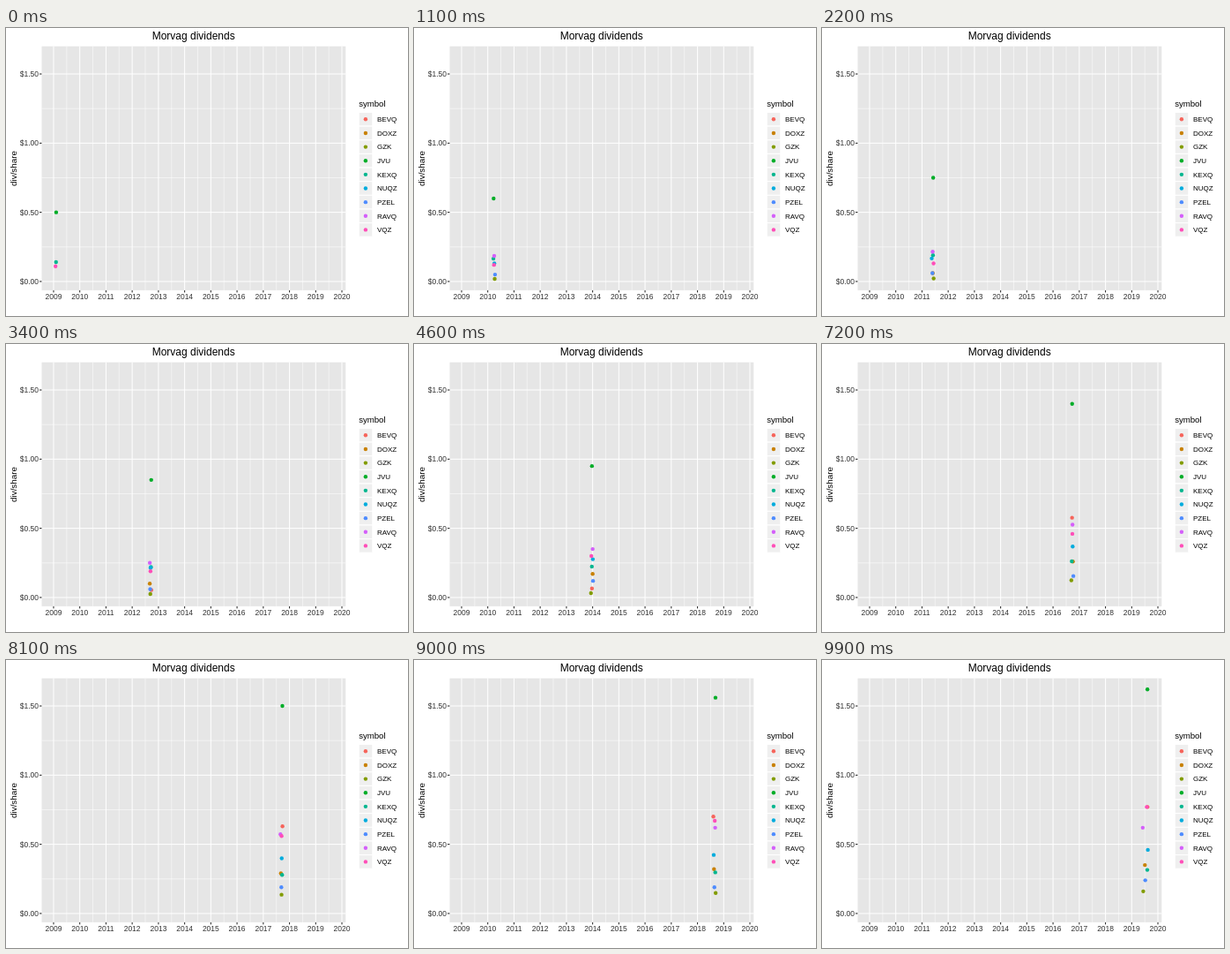
Write an HTML page with a canvas that moves like this. It is 456 px wide and 326 px high and loops after 10000 ms.

```html
<!DOCTYPE html>
<html lang="en">
<head>
<meta charset="utf-8">
<title>Morvag dividends</title>
<style>
  html, body { margin: 0; width: 456px; height: 326px; overflow: hidden; background: #fff; }
  canvas, svg { position: absolute; left: 0; top: 0; display: block; }
  text { font-family: "Liberation Sans", Arial, sans-serif; }
</style>
</head>
<body>
<canvas id="chart" width="456" height="326"></canvas>
<svg id="labels" width="456" height="326"></svg>
<script>
const DAY = 864e5;
const FRAMES = 100, FRAME_MS = 100;
const FIRST = Date.UTC(2009, 0, 28) / DAY;
const LAST = Date.UTC(2019, 7, 14) / DAY;
const SHORT_LAG = Date.UTC(2017, 8, 5) / DAY;
const panel = { l: 40.5, r: 385.3, t: 20.7, b: 296.9 };

// record: [month in quarter, day, optional weekday to move forward to]
// trend: [quarter, value] key points; the value is held between raises,
// which come every four quarters unless "every" says otherwise.
const series = [
  { name: "BEVQ", color: "#f6645b", record: [1, 8, 1], start: 14,
    trend: [[14, .054], [18, .065], [22, .47], [34, .63], [42, .77]] },
  { name: "DOXZ", color: "#c88100", record: [0, 5], start: 9,
    trend: [[9, .06], [13, .1], [17, .17], [25, .21], [29, .26], [41, .35]] },
  { name: "GZK", color: "#829c00", record: [2, 9, 3],
    trend: [[-1, .015], [23, .035], [27, .124], [39, .16]] },
  { name: "JVU", color: "#00ad28", record: [1, 10],
    trend: [[-3, .5], [1, .55], [17, .95], [21, 1.1], [25, 1.3], [33, 1.5], [41, 1.62]] },
  { name: "KEXQ", color: "#00b68f", record: [1, 7],
    trend: [[0, .14], [8, .19], [12, .22], [20, .225], [40, .315]] },
  { name: "NUQZ", color: "#00acdd", record: [1, 15, 4],
    trend: [[3, .13], [39, .46]] },
  { name: "PZEL", color: "#4e8cff", record: [0, 8, 3], start: 1, every: 8,
    trend: [[1, .05], [9, .06], [17, .12], [33, .19], [41, .24]] },
  { name: "RAVQ", color: "#d45ffa", record: [2, -1, 3],
    trend: [[-3, .16], [9, .215], [13, .25], [17, .35], [25, .48], [37, .62]] },
  { name: "VQZ", color: "#ff4eb8", record: [1, 0],
    trend: [[-1, .11], [7, .13], [15, .21], [19, .3], [27, .38], [35, .62], [39, .77]] }
];

const weekday = d => (d + 4) % 7;
const isWeekend = d => weekday(d) % 6 === 0;

// One or two business days before the record date.
function exDate([month, day, wd], q) {
  let d = Date.UTC(2009, q * 3 + month, day) / DAY;
  if (wd !== undefined) d += (wd - weekday(d) + 7) % 7;
  while (isWeekend(d)) d--;
  for (let lag = d > SHORT_LAG ? 1 : 2; lag > 0;) if (!isWeekend(--d)) lag--;
  return d;
}

function interpolate(points, x) {
  if (x <= points[0][0]) return points[0][1];
  const i = points.findIndex(p => p[0] > x);
  if (i < 0) return points[points.length - 1][1];
  const [x0, y0] = points[i - 1], [x1, y1] = points[i];
  return y0 + (y1 - y0) * (x - x0) / (x1 - x0);
}

function addTracks(s) {
  const { record, trend, start = 0, every = 4 } = s;
  const base = trend[0][0];
  s.dates = [];
  s.values = [];
  for (let q = start, date; (date = exDate(record, q)) <= LAST; q++) {
    const frame = Math.round((date - FIRST) / (LAST - FIRST) * (FRAMES - 1));
    const raise = base + Math.floor((q - base) / every) * every;
    s.dates.push([frame, date]);
    s.values.push([frame, interpolate(trend, raise)]);
  }
}
series.forEach(addTracks);

// Both scales leave 5% of the data range free on each side.
const LOW = .0165, HIGH = 1.62;
const scale = (v, a, b, from, to) => from + (to - from) * ((v - a) / (b - a) + .05) / 1.1;
const xOf = date => scale(date, FIRST, LAST, panel.l, panel.r);
const yOf = value => scale(value, LOW, HIGH, panel.b, panel.t);
const yearX = y => xOf(Date.UTC(y, 0, 1) / DAY);
const keyY = i => 103.3 + i * 15.64;

const ctx = document.getElementById("chart").getContext("2d");

function line(x1, y1, x2, y2, width, color) {
  ctx.strokeStyle = color;
  ctx.lineWidth = width;
  ctx.beginPath();
  ctx.moveTo(x1, y1);
  ctx.lineTo(x2, y2);
  ctx.stroke();
}
const vLine = (x, w) => line(x, panel.t, x, panel.b, w, "#fff");
const hLine = (y, w) => line(panel.l, y, panel.r, y, w, "#fff");

function dot(x, y, color) {
  ctx.fillStyle = color;
  ctx.beginPath();
  ctx.arc(x, y, 2.2, 0, Math.PI * 2);
  ctx.fill();
}

function drawBase() {
  ctx.fillStyle = "#fff";
  ctx.fillRect(0, 0, 456, 326);
  ctx.fillStyle = "#e6e6e6";
  ctx.fillRect(panel.l, panel.t, panel.r - panel.l, panel.b - panel.t);
  for (let y = 2009; y < 2020; y++) vLine((yearX(y) + yearX(y + 1)) / 2, .5);
  for (let v = .25; v < 1.5; v += .5) hLine(yOf(v), .5);
  for (let y = 2009; y <= 2020; y++) {
    vLine(yearX(y), 1);
    line(yearX(y), panel.b, yearX(y), panel.b + 2.5, 1, "#222");
  }
  for (let v = 0; v <= 1.5; v += .5) {
    hLine(yOf(v), 1);
    line(panel.l - 2.5, yOf(v), panel.l, yOf(v), 1, "#222");
  }
  series.forEach((s, i) => {
    ctx.fillStyle = "#efefef";
    ctx.fillRect(400.2, keyY(i) - 7.8, 15.6, 15.6);
    ctx.strokeStyle = "#fff";
    ctx.lineWidth = 1;
    ctx.strokeRect(400.2, keyY(i) - 7.8, 15.6, 15.6);
    dot(407.9, keyY(i), s.color);
  });
}

function label(str, x, y, size, anchor, color = "#000", turn = 0) {
  const el = document.createElementNS("http://www.w3.org/2000/svg", "text");
  el.textContent = str;
  const attrs = { x, y, "font-size": size, "text-anchor": anchor, fill: color };
  if (turn) attrs.transform = `rotate(${turn} ${x} ${y})`;
  for (const name in attrs) el.setAttribute(name, attrs[name]);
  document.getElementById("labels").append(el);
}

function addLabels() {
  const gray = "#333";
  label("Morvag dividends", 212.7, 13, 12, "middle");
  label("div/share", 11.5, 159, 9.8, "middle", "#000", -90);
  label("symbol", 400.2, 89.3, 9.6, "start");
  for (let y = 2009; y <= 2020; y++) label(y, yearX(y), 307.3, 8.5, "middle", gray);
  for (let v = 0; v <= 1.5; v += .5) label("$" + v.toFixed(2), 37, yOf(v) + 3, 8.5, "end", gray);
  series.forEach((s, i) => label(s.name, 421, keyY(i) + 2.8, 8, "start"));
}

function draw(frame) {
  drawBase();
  for (const { dates, values, color } of series) {
    if (frame < dates[0][0]) continue;
    dot(xOf(interpolate(dates, frame)), yOf(interpolate(values, frame)), color);
  }
}

addLabels();
draw(0);
const begin = performance.now();
function tick() {
  const t = performance.now() - begin;
  draw(Math.floor(t / FRAME_MS) % FRAMES);
  requestAnimationFrame(tick);
}
requestAnimationFrame(tick);
</script>
</body>
</html>
```
